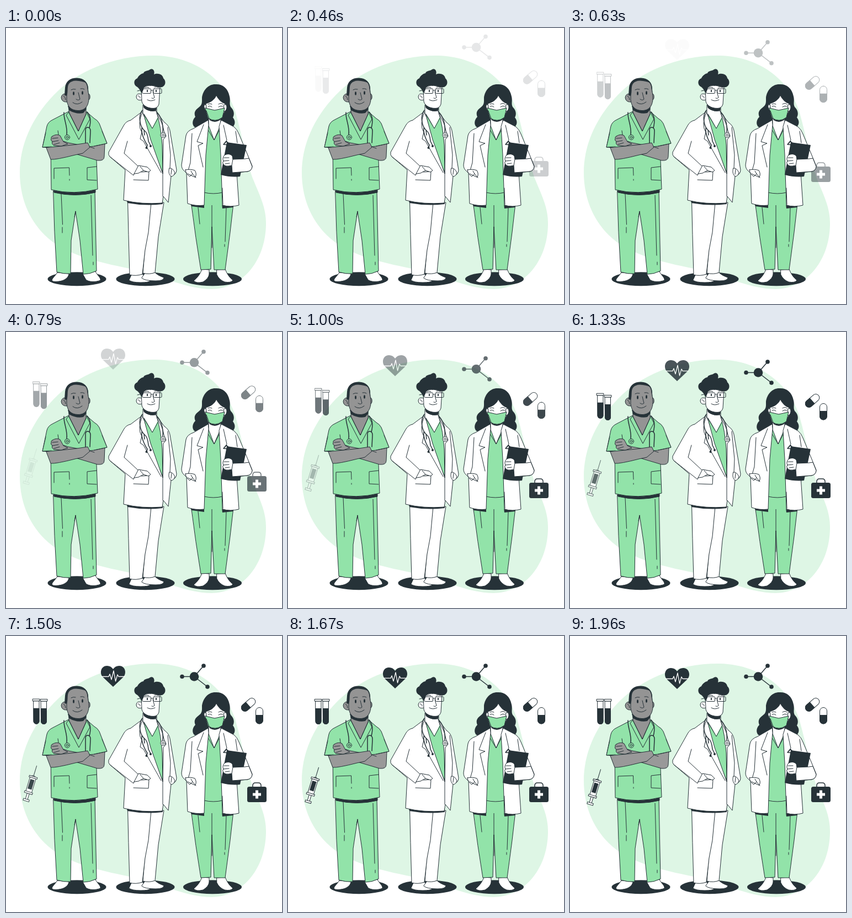
An HTML page that plays this animation: 500 by 500 pixels, repeating every 2000 ms.

```html
<!DOCTYPE html>
<html lang="en">
<head>
<meta charset="utf-8">
<title>Medical team</title>
<style>
html, body { margin: 0; width: 100%; height: 100%; overflow: hidden; background: #fff; }
svg { display: block; width: 100vw; height: 100vh; }
path, rect, circle, ellipse { stroke-linejoin: round; stroke-linecap: round; }
.o { stroke: #263238; stroke-width: 1; }
.l { fill: none; stroke: #263238; stroke-width: 1; }
.w { fill: #fff; }
.g { fill: #92e3a9; }
.s { fill: #949494; }
.a { fill: #999; }
.d { fill: #263238; }
.t { fill: none; stroke: #263238; stroke-width: 1.5; }
.icon { opacity: 0; }
</style>
</head>
<body>
<svg viewBox="0 0 500 500">
  <path fill="#def6e5" d="M25 262C25 213 46 164 86 122C127 79 195 49 272 50C340 52 395 90 415 150C428 195 434 235 446 270C458 300 472 325 471 356C470 425 425 473 372 473C328 473 288 451 225 436C165 424 105 410 70 375C40 345 25 305 25 262Z"/>

  <!-- icons -->
  <g class="icon" id="kit">
    <path class="t" d="M447 274V271Q447 266 452 266H457Q462 266 462 271V274"/>
    <rect class="d" x="437" y="273" width="35" height="28" rx="3.5"/>
    <path class="w" d="M452 279.500h5v5h5v5h-5v5h-5v-5h-5v-5h5z"/>
  </g>
  <g class="icon" id="pillR">
    <rect class="o w" x="452.500" y="129.500" width="13" height="29.500" rx="6.500"/>
    <path class="d" d="M452 143H466V152.500A7 7 0 0 1 452 152.500Z"/>
  </g>
  <g class="icon" id="pillL">
    <g transform="translate(439 124.500) rotate(49)">
      <rect class="o w" x="-6.500" y="-14.800" width="13" height="29.500" rx="6.500"/>
      <path class="d" d="M-7 0H7V8A7 7 0 0 1 -7 8Z"/>
    </g>
  </g>
  <g class="icon" id="molecule">
    <path class="t" d="M319 73.500L341 73.500L358 54M341 73.500L365 92"/>
    <g class="d">
      <circle cx="341" cy="73.500" r="8.300"/><circle cx="358" cy="54" r="3.800"/>
      <circle cx="319" cy="73.500" r="3.800"/><circle cx="365" cy="92" r="3.800"/>
    </g>
  </g>
  <g class="icon" id="tubeR">
    <path class="o w" d="M63.500 118H73.500V154.500A5 5 0 0 1 63.500 154.500Z"/>
    <path class="d" d="M63 131H74V154.500A5.500 5.500 0 0 1 63 154.500Z"/>
    <rect class="o w" x="62.500" y="114.500" width="12.500" height="3.500"/>
  </g>
  <g class="icon" id="tubeL">
    <path class="o w" d="M50 118H60V154.500A5 5 0 0 1 50 154.500Z"/>
    <path class="d" d="M49.500 131H60.500V154.500A5.500 5.500 0 0 1 49.500 154.500Z"/>
    <rect class="o w" x="48.500" y="114.500" width="12.500" height="3.500"/>
  </g>
  <g class="icon" id="heart">
    <path class="d" d="M194 96L175 78C169 71 172 58 183 58Q190 58 194 64Q198 58 205 58C216 58 219 71 213 78Z"/>
    <path fill="none" stroke="#fff" stroke-width="1.300" d="M173 77.500H186L188 73L191 83L195 67L198.500 86L202 74L204 77.500H215"/>
  </g>
  <g class="icon" id="syringe">
    <g transform="translate(50 260) rotate(17)">
      <path class="l" d="M0 -19V0"/>
      <path class="o w" d="M-2.500 3V0H2.500V3"/>
      <rect class="o w" x="-7.500" y="1" width="15" height="3"/>
      <rect class="o w" x="-5.500" y="4" width="11" height="27"/>
      <rect class="d" x="-3.800" y="7" width="7.600" height="18"/>
      <rect class="o w" x="-2" y="33" width="4" height="12"/>
      <rect class="o w" x="-7.500" y="30" width="15" height="3.200"/>
      <rect class="o w" x="-5.500" y="44" width="11" height="3.500"/>
    </g>
  </g>

  <g class="d">
    <ellipse cx="128.500" cy="454.700" rx="53" ry="12.500"/>
    <ellipse cx="252.500" cy="454.700" rx="53" ry="12.500"/>
    <ellipse cx="374" cy="454.700" rx="53" ry="12.500"/>
  </g>

  <!-- nurse -->
  <g>
    <path class="o w" d="M93 443L114 445C113 455 100 461 85 459C80 456 88 451 93 443Z"/>
    <path class="o w" d="M139 445L162 441C165 448 172 452 171 457C162 461 149 460 145 456Z"/>
    <path class="o g" d="M86 295H161L164 440Q152 446 140 446L134 385L126 332L118 385L117 445Q105 446 92 442L88 370Z"/>
    <path class="l" d="M100 300L102.500 356M102 361V371M154 303L157 412M158 424V429M126 332L124 342"/>
    <path class="o d" d="M86 290L87 298Q125 307 162 298V290Z"/>
    <path class="o g" d="M114 151L85 166Q76 170 74 178L66 216L81 217L82 293Q123 303 166 292L163 214L183 209L169 173Q166 167 160 164L146 152Z"/>
    <path class="l" d="M94 186L96 199M87 273V254L114.500 253L115 267M115 274V276M164 251L147 253V275L164 276"/>
    <path class="s o" d="M114 140V153L131 187L145 156V138Z"/>
    <path class="d" d="M112 141L114 149Q128 157 140 154L145 148L146 139Z"/>
    <path class="l" d="M114 152L109 158L132 202L152 165L146 153M114 153L131 187L145 156"/>
    <path class="s o" d="M110 119Q101 118 100 126Q101 135 111 134ZM148 119Q153 118 152 127Q150 132 148 131Z"/>
    <path class="s o" d="M110 110C109 88 147 88 148 108L150 123C151 140 144 150 130 149.500C117 149 111 142 110 130Z"/>
    <path class="d" d="M106 122L107 108C108 96 117 90 129 90.500C141 91 149 98 149 110V117C147 112 148 104 144 99Q138 96 127 95.500Q118 95.500 114 101C110 107 113 115 110 123Z"/>
    <ellipse class="d" cx="122.500" cy="118.500" rx="1.500" ry="3.300"/>
    <ellipse class="d" cx="138.500" cy="117.500" rx="1.500" ry="3.300"/>
    <path class="l" d="M118 112Q121 110 126 111M135 110Q139 109 142 111M131 117L134 129Q131 132 127 129M121 135Q129 141 138 134M104 123Q107 124 108 130"/>
    <path class="t" d="M105 153C104 165 112 178 110 193M147 152C154 160 154 170 151 181M144 208V185Q144 180 148 180Q153 180 153 187L152 208"/>
    <circle class="l" cx="111" cy="198" r="4.500"/><circle class="l" cx="111" cy="198" r="2"/>
    <path class="a o" d="M160 214L179 210L178 233Q178 241 166 240L129 229L101 214L104 205L113 208L151 215Z"/>
    <path class="a o" d="M73 217L81 238Q90 239 125 230L139 227L152 216L148 208L128 211L101 214Z"/>
    <path class="a o" d="M84 196Q92 191 98 195L104 206L112 210L100 214L87 213Q82 210 84 206Q80 203 82 200Q81 197 84 196Z"/>
    <path class="l" d="M84 200L94 199M84 206L95 204M87 211L97 208M151 215L160 218"/>
    <path class="g" d="M66 216L81 216V196L72 190ZM160 213L183 209L174 187L162 196Z"/>
    <path class="l" d="M72 190L66 216L82 215M174 187L183 209L160 214"/>
  </g>

  <!-- doctor -->
  <g>
    <path class="o w" d="M228 446L248 446Q251 454 261 458Q259 461 244 461Q228 461 223 457Z"/>
    <path class="o w" d="M252 444L269 442Q274 448 286 452Q286 458 271 458Q251 458 246 453Z"/>
    <path class="o w" d="M263 316H286L276 378L270 443Q260 447 248 444L253 385Z"/>
    <path class="o w" d="M221 316H263L258 370L252 402L247 446Q235 450 224 447L222 375Z"/>
    <path class="o w" d="M248 140V160L262 185L273 160V140Z"/>
    <path class="d" d="M248 138L250 145Q260 153 272 150L273 142Z"/>
    <path class="o g" d="M250 156L264 178L274 156L286 180L285 264L262 215Z"/>
    <path class="w" d="M252 158L265 181L275 161L273 152Z"/>
    <path class="d" d="M248 138L250 145Q260 153 272 150L273 142Z"/>
    <path class="l" d="M252 160L265 182L276 162"/>
    <path class="d" d="M218 310L220 317Q252 323 284 319V310Z"/>
    <path class="o w" d="M246 152L226 167Q217 169 213 177L186 225Q185 230 188 233L216 257L213 312Q246 320 283 317L285 305L294 316L299 268Q309 266 309 257L297 186Q295 176 287 171L273 153Q281 180 283 212L284 264L262 202L251 162Z"/>
    <path class="l" d="M220 205L214 227L240 251M246 155Q238 176 246 189L243 201L249 205L281 262M273 155Q284 172 286 186L290 196L285 202L284 265V305M293 180L298 230L297 254M188 233L231 267M231 275L258 276L259 260L245 261"/>
    <path class="o w" d="M231 266L240 249L256 252L262 258L258 261L249 258L240 263L233 264Z"/>
    <path class="o w" d="M296 254Q302 253 306 262Q304 269 299 269Q294 264 295 258Z"/>
    <path class="l" d="M300 256L299 265M243 251L249 258"/>
    <path class="t" d="M247 149C240 158 241 176 250 185L251 194M246 181Q245 190 250 201Q253 208 256 212L255 216M250 185Q257 190 258 205L262 213M272 151C282 161 285 176 284 189"/>
    <circle class="d" cx="254.500" cy="217" r="2"/><circle class="d" cx="262" cy="214" r="2"/>
    <circle class="o w" cx="284.500" cy="194" r="4.500"/><circle class="l" cx="284.500" cy="194" r="2"/>
    <path class="o w" d="M246 120Q236 117 236 125Q237 133 247 130Z"/>
    <path class="o w" d="M245 104L246 133C248 142 260 147 271 145Q276 143 277 138L279 105Q262 93 245 104Z"/>
    <path class="d" d="M245 118Q243 111 238 107C231 104 230 94 238 91C240 86 246 82 249 82C250 77 258 78 261 75C267 72 270 79 268 84C274 81 284 83 285 91C290 95 290 104 283 107C276 109 268 104 262 105C254 104 249 107 249 112Z"/>
    <rect class="l" x="247" y="110" width="15.500" height="8.500" rx="1.500"/>
    <rect class="l" x="267" y="110" width="15" height="8.500" rx="1.500"/>
    <path class="l" d="M262.500 113H267M238 114L247 112M251 108Q255 106 259 108M269 107Q273 106 277 108M266 115L269 126Q267 129 264 127M256 130Q262 134 270 130M239 123Q243 123 243 127"/>
    <ellipse class="d" cx="256" cy="114" rx="1.100" ry="2.200"/><ellipse class="d" cx="272" cy="114" rx="1.100" ry="2.200"/>
  </g>

  <!-- masked doctor -->
  <g>
    <path class="o w" d="M355 437L368 438V446Q367 454 357 460Q345 463 340 458Q351 449 355 437Z"/>
    <path class="o w" d="M382 438L397 437Q402 450 411 457Q408 462 396 460Q386 456 382 447Z"/>
    <path class="o g" d="M336 318H412L406 370L397 438L377 438L373 360L371 437L353 438L344 380Z"/>
    <path class="l" d="M373 320V398M348 325L351 355M399 326L397 387M396 392V396"/>
    <path class="d" d="M334 318L336 323L359 326V319ZM391 319L392 327L411 325L413 320Z"/>
    <path class="d" d="M381 102C367 101 357 112 355 126C355 134 356 139 349 144C342 149 340 154 343 161C337 167 337 175 341 179C349 183 358 178 365 172L398 173C402 180 408 182 412 178C416 173 415 167 411 162C415 155 412 148 407 143C404 137 407 132 405 124C402 109 393 102 381 102Z"/>
    <path class="g" d="M362 174H390L392 321H359Z"/>
    <path class="l" d="M359 298Q376 302 392 298"/>
    <path class="o w" d="M367 160V177L377 203L389 175V160Z"/>
    <path class="l" d="M364 181L377 203L390 178"/>
    <path class="d" d="M366 160L369 167Q380 174 391 164V158Z"/>
    <path class="o w" d="M381 122C377 132 368 135 362 137L363 153Q366 163 378 165Q391 164 396 152L397 137Q387 134 381 122Z"/>
    <path class="o w" d="M395 139Q400 137 400 144Q399 151 395 151ZM362 139Q358 138 359 144Q360 149 363 149Z"/>
    <path class="o g" d="M361 145L378 149L396 145L392 162Q379 172 366 163Z"/>
    <path class="l" d="M366 138Q369 136 373 138M385 138Q389 135 393 138M366 142Q370 140 373 143M385 143Q389 140 393 142M368 164L363 150"/>
    <path class="o w" d="M366 167L340 182Q328 186 326 195L318 248Q318 255 323 259L327 263L329 318Q344 323 359 321L362 230L367 176Z"/>
    <path class="l" d="M337 191L334 244L330 258M358 175L346 206L357 209L348 213L357 252"/>
    <path class="o w" d="M390 167L413 179Q419 184 422 192L437 228L446 250Q446 258 438 260L418 262L422 321Q407 325 392 321L389 230L386 179Z"/>
    <path class="l" d="M394 176L400 203L397 209M416 187L419 208M392 290L393 320"/>
    <path class="o w" d="M325 257Q335 255 342 258Q346 264 343 270L338 264L333 269Q326 265 325 257Z"/>
    <path class="l" d="M329 264L344 271M335 259L338 264"/>
    <path class="d" d="M400 207L436 212L424 269Q407 271 389 266Z"/>
    <path class="t" d="M399 205L407 212L394 211Z"/>
    <path class="o w" d="M396 230Q405 226 410 232L411 238L433 237L440 236L446 251Q445 259 437 260L410 262L409 249Q397 252 394 247Q391 244 394 241Q391 236 396 230Z"/>
    <path class="l" d="M395 235L404 235M394 241L404 240M397 246L405 245M411 238L409 249"/>
  </g>
</svg>
<script>
const LOOP = 2000, STEP = 1000 / 24;

// Shared downward drift: [ms, px]; each icon stops once it passes its rest point.
const drift = [[270, -43.500], [460, -32], [790, -12], [1000, 0], [1330, 9], [1670, 15], [1940, 19]];

// Icon: [rest point on the drift, fade start, fade end]
const icons = {
  kit: [0, 290, 1020],
  pillR: [2.300, 350, 1080],
  pillL: [3, 360, 1090],
  molecule: [6.300, 360, 1260],
  tubeR: [8.800, 380, 1220],
  tubeL: [12.300, 440, 1280],
  heart: [16, 615, 1480],
  syringe: [18.500, 725, 1600]
};

const clamp = x => Math.min(1, Math.max(0, x));

function driftAt(t) {
  let y = drift[0][1];
  for (let i = 1; i < drift.length; i++) {
    const [t0, y0] = drift[i - 1], [t1, y1] = drift[i];
    y += (y1 - y0) * clamp((t - t0) / (t1 - t0));
  }
  return y;
}

function draw(now) {
  const t = Math.floor((now % LOOP + 5) / STEP) % 48 * STEP;
  const y = driftAt(t);
  for (const id in icons) {
    const [rest, start, end] = icons[id];
    const el = document.getElementById(id);
    el.style.opacity = clamp((t - start) / (end - start));
    el.setAttribute("transform", `translate(0 ${Math.min(0, y - rest).toFixed(2)})`);
  }
}

const begin = performance.now();
function tick() {
  draw(performance.now() - begin);
  requestAnimationFrame(tick);
}
tick();
</script>
</body>
</html>
```
